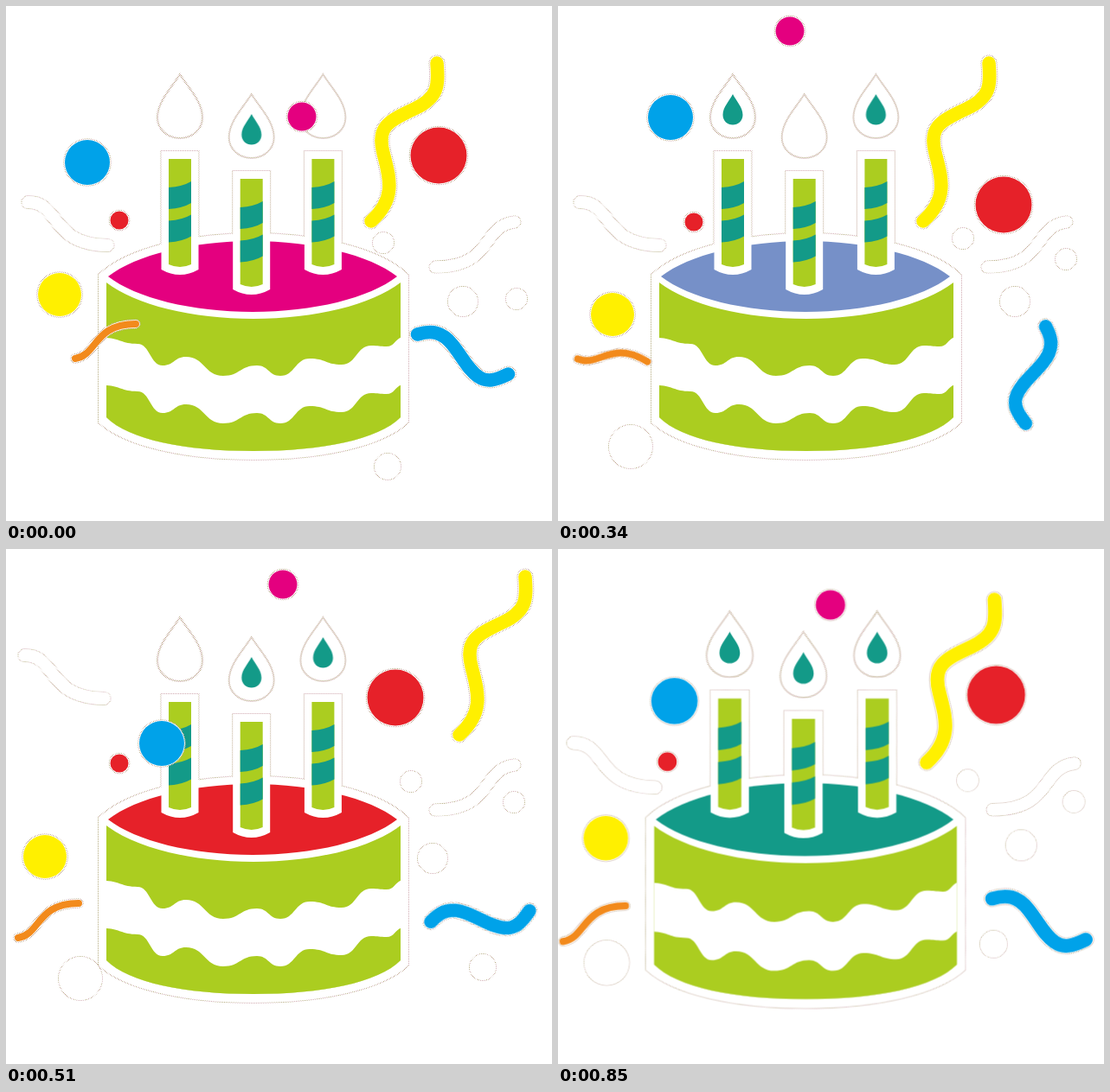
These frames come from a looping animation (631x596 px, 1.02 s). An HTML page:

```html
<!DOCTYPE html>
<html lang="en">
<head>
<meta charset="utf-8">
<title>Birthday cake</title>
<style>
html, body { margin: 0; width: 100%; height: 100%; overflow: hidden; background: #fff; }
svg { display: block; width: 631px; height: 596px; }
.green { fill: #abcd20; }
.teal { fill: #139a88; }
.white { fill: #fff; }
.edge { fill: #fff; stroke: url(#speck); stroke-width: 2; }
.line { fill: none; stroke-linecap: round; stroke-linejoin: round; }
#scene { transform-origin: 286px 312px; }
</style>
</head>
<body>
<svg viewBox="0 0 631 596">
  <defs>
    <pattern id="speck" width="2" height="2" patternUnits="userSpaceOnUse">
      <rect width="1" height="1" fill="#b5ab80"/>
      <rect x="1" y="1" width="1" height="1" fill="#d0a9b0"/>
    </pattern>
    <path id="shell" d="M107 311C140 279 215 263 286 263S432 279 465 311V482C435 510 365 525 286 525S137 510 107 482Z"/>
    <path id="stick" d="M179.500 168H222.500V305Q201 317 179.500 305Z"/>
    <path id="wave"/>
    <clipPath id="body">
      <path d="M116 320C150 346 215 362 286 362S422 346 456 320V476C430 502 365 515 286 515S142 502 116 476Z"/>
    </clipPath>
    <g id="candle">
      <use href="#stick" class="white"/>
      <path class="green" d="M188 177H214V299Q201 305 188 299Z"/>
      <path id="stripe" class="teal" d="M188 210Q204 209 214 203V228Q204 234 188 235Z"/>
      <use href="#stripe" y="38.500"/>
    </g>
    <path id="flame" d="M201 79C210 94 227 110 227 129C227 143 215 153 201 153S175 143 175 129C175 110 192 94 201 79Z"/>
    <path id="spark" d="M201 102C205 110 212.500 117 212.500 126C212.500 133 207 137.500 201 137.500S189.500 133 189.500 126C189.500 117 197 110 201 102Z"/>
  </defs>
  <g id="scene">
    <g id="cake">
      <g id="backs"></g>
      <use href="#shell" class="white"/>
      <g clip-path="url(#body)">
        <rect class="green" x="110" y="310" width="352" height="215"/>
        <use href="#wave" class="white"/>
        <use href="#wave" class="green" y="55"/>
      </g>
      <path id="icing" d="M118 313C150 288 215 272 285 272S420 288 452 313C420 338 355 354 285 354S150 338 118 313Z"/>
      <g id="candles"></g>
    </g>
    <g id="confetti"></g>
  </g>
</svg>
<script>
const STEP = 170, COUNT = 6;
const PINK = '#e4007f', TEAL = '#139a88', RED = '#e62129', YELLOW = '#fff000', BLUE = '#00a2e9';
const beats = [...Array(COUNT).keys()];
const $ = id => document.getElementById(id);

function add(parent, tag, attrs) {
  const el = document.createElementNS('http://www.w3.org/2000/svg', tag);
  for (const key in attrs) el.setAttribute(key, attrs[key]);
  return parent.appendChild(el);
}

// Holds each value for one beat, then jumps to the next.
function hold(el, prop, valueAt) {
  const frames = [...beats, 0].map(b => ({ [prop]: valueAt(b), easing: 'step-end' }));
  el.animate(frames, { duration: STEP * COUNT, iterations: Infinity });
}

// Rests at home and hops away only on the beats named: [dx, dy, turn, size].
function hop(el, [x, y], hops) {
  hold(el, 'transform', b => {
    const [dx, dy, turn = 0, size = 1] = hops[b] || [0, 0];
    return `translate(${x + dx}px, ${y + dy}px) rotate(${turn}deg) scale(${size})`;
  });
}

// Joins crests and troughs with level tangents.
function smooth(points) {
  return points.map(([x, y], i) => {
    if (!i) return `M${x} ${y}`;
    const [px, py] = points[i - 1], mid = (px + x) / 2;
    return `C${mid} ${py} ${mid} ${y} ${x} ${y}`;
  }).join('');
}

$('wave').setAttribute('d', smooth([
  [112, 384], [152, 391], [181, 416], [208, 406], [251, 428], [290, 416],
  [317, 428], [351, 408], [388, 415], [422, 393], [440, 394], [460, 383]
]) + 'V530H112Z');

// Cake, candles and flames
add($('backs'), 'use', { href: '#shell', class: 'edge' });
const unlit = [[0, 3], [2], [0, 1]];
unlit.forEach((dark, i) => {
  const x = 82.7 * i, y = i % 2 * 23;
  add($('backs'), 'use', { href: '#stick', class: 'edge', x, y });
  add($('candles'), 'use', { href: '#candle', x, y });
  add($('candles'), 'use', { href: '#flame', class: 'edge', x, y });
  const spark = add($('candles'), 'use', { href: '#spark', class: 'teal', x, y });
  hold(spark, 'opacity', b => dark.includes(b) ? 0 : 1);
});

const icings = [PINK, TEAL, '#7690c8', RED, YELLOW, TEAL];
hold($('icing'), 'fill', b => icings[b]);
hop($('cake'), [0, 0], { 1: [1, 0], 2: [1, 0], 4: [0.6, 0] });
hop($('scene'), [0, 0], { 5: [0, 0, 0, 1.03] });

// Confetti
function ribbon(d, w, color, home, hops) {
  const g = add($('confetti'), 'g', { class: 'line' });
  const gap = color === '#fff' ? 0 : 1.5;
  const layer = (stroke, width) => add(g, 'path', { d, stroke, 'stroke-width': width });
  layer('url(#speck)', w + gap + 2);
  layer('#fff', w + gap);
  layer(color, w);
  hop(g, home, hops);
}

function dot(r, color, home, hops) {
  const g = add($('confetti'), 'g', {});
  const gap = color === '#fff' ? 0 : 0.8;
  add(g, 'circle', { r: r + gap + 1, fill: 'url(#speck)' });
  add(g, 'circle', { r: r + gap, fill: '#fff' });
  add(g, 'circle', { r, fill: color });
  hop(g, home, hops);
}

const gone = [0, 0, 0, 0];

ribbon('M-46 -25C-8 -25 -22 24 46 25', 14, '#fff', [71.5, 252], { 1: [-4, 16, -32], 3: [-4, -104] });
ribbon('M-46 26C22 26 7 -22 46 -26', 13, '#fff', [542, 276], { 4: [23, 30] });
ribbon('M38 -92C40 -66 40 -52 12 -39C-18 -25 -32 -18 -24 12C-17 40 -8 64 -38 91', 15.5, YELLOW,
  [460, 158], { 1: [0, 0, -36], 3: [102, -34] });
ribbon('M-52.5 -23C-36 -28 -24 -26 -12 -11C0 4 6 18 18 26C28 33 38 30 52.5 23', 15.5, BLUE,
  [548, 425], { 0: [-20, -22], 1: [18, 3], 2: [4, 2, 78], 3: [0, 0, -30], 4: [21, 76] });
ribbon('M-35 20C-9 16 -14 -20 35 -20', 8, '#f28a1c',
  [49, 430], { 0: [66, -42], 1: [13, -6, 35], 2: [14, -20, 32] });

dot(12, '#fff', [468, 269], { 0: [-32, 5] });
dot(17, '#fff', [528, 342], { 1: [29, 22], 3: [-35, 16], 4: [48, 61] });
dot(12, '#fff', [587, 293], { 0: [3, 46], 1: [2, 25], 4: [23, -96] });
dot(15, '#fff', [497, 453], { 0: [-56, 80], 1: gone, 2: gone, 3: [54, 31] });
dot(25, '#fff', [63, 474], { 0: gone, 1: [14, -33, 0, 0.77], 2: [21, 36], 3: [23, 23], 4: [55, 14] });

dot(26, BLUE, [139, 180], { 0: [-45, 1], 2: [-9, -51], 3: [41, 45], 4: [-27, 55] });
dot(16.5, PINK, [314, 72], { 0: [28, 56], 1: [6, 27], 2: [-46, -43], 3: [6, -31] });
dot(32.5, RED, [500, 173], { 1: [43, 28], 2: [15, 57], 3: [-50, -1] });
dot(10.5, RED, [131, 248], { 2: [26, 2], 4: [-108, 44] });
dot(25, YELLOW, [62, 334], { 2: [1, 23], 3: [-17, 22], 4: [-33, 40] });
</script>
</body>
</html>
```
